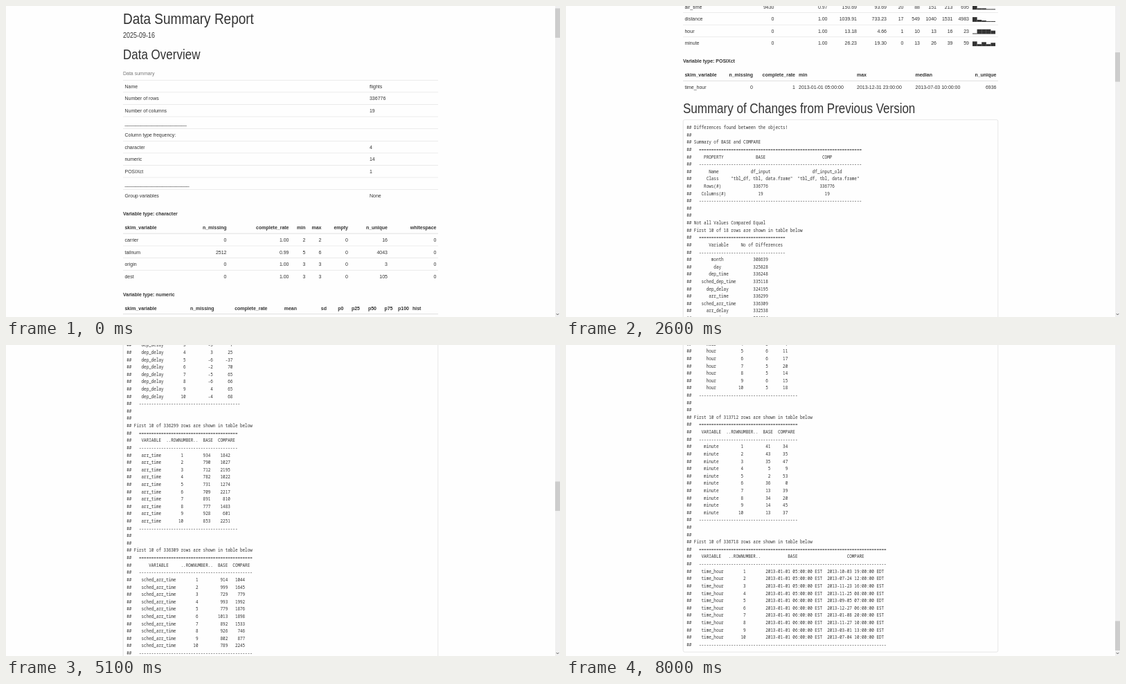
An HTML page for the animation above (8.7 s loop, 800 px wide and 450 px high).

```html
<!DOCTYPE html>
<html lang="en">
<head>
<meta charset="utf-8">
<title>Data Summary Report</title>
<style>
  html, body { margin: 0; height: 100%; overflow: hidden; background: #fefefe; }
  svg { display: block; width: 800px; height: 450px; }
  text { font: 14px "Liberation Sans", Arial, sans-serif; fill: #333; white-space: pre; }
  .title { font-size: 38px; }
  .date { font-size: 18px; }
  .h1 { font-size: 34px; }
  .caption { fill: #777; }
  .bold { font-weight: bold; }
  .code { font: 11.917px "Noto Sans Mono", monospace; }
  .end { text-anchor: end; }
</style>
</head>
<body>
<svg id="stage" viewBox="0 0 800 450"></svg>
<script>
const LOOP = 8700, SX = 0.5, SY = 0.5714;   // page units to stage pixels
const LEFT = 338, WIDTH = 910, ROW = 30.8, LINE = 18.5714;
const TOTAL = 336776;

const add = (parent, tag, attrs, content = "") => {
  const el = document.createElementNS("http://www.w3.org/2000/svg", tag);
  for (const key in attrs) el.setAttribute(key, attrs[key]);
  el.textContent = content;
  parent.append(el);
  return el;
};
const stage = document.getElementById("stage");
const page = add(stage, "g", {});
const write = (content, x, y, cls = "") => add(page, "text", { x, y, class: cls }, content);
const box = (x, y, width, height, fill, parent = page) =>
  add(parent, "rect", { x, y, width, height, fill });

let seed = 7;
const random = () => (seed = seed * 16807 % 2147483647) / 2147483647;
const between = (lo, hi) => Math.floor(lo + random() * (hi - lo + 1));
const pick = words => words.split(" ")[between(0, words.split(" ").length - 1)];
const clamp = (v, lo, hi) => Math.min(hi, Math.max(lo, Math.round(v)));

// ---- Tables: a positive column is a right edge, a negative one a left edge
const cell = (content, col, y, cls = "") =>
  write(content, Math.abs(col), y, cls + (col > 0 ? " end" : ""));

function hist(levels, x, y) {
  [...levels].forEach((n, i) => box(x + i * 13.2, y + 3 - n * 1.7, 13.3, n * 1.7, "#333"));
}

function table(top, cols, head, rows) {
  head.split(" ").forEach((h, i) => cell(h, cols[i], top + 20, "bold"));
  box(LEFT, top + 30, WIDTH, 1.6, "#ddd");
  rows.forEach((row, r) => {
    const y = top + 51.6 + r * ROW;
    if (r) box(LEFT, y - 20.8, WIDTH, 1, "#ddd");
    row.forEach((v, i) => i === 10 ? hist(v, -cols[i], y) : cell(v, cols[i], y));
  });
}

write("Data Summary Report", LEFT, 46.15, "title");
write("2025-09-16", LEFT, 79.95, "date");
write("Data Overview", LEFT, 134.55, "h1");
write("Data summary", LEFT, 174.25, "caption");
[
  ["Name", "flights"], ["Number of rows", TOTAL], ["Number of columns", "19"],
  ["_".repeat(23)], ["Column type frequency:"], ["character", "4"], ["numeric", "14"],
  ["POSIXct", "1"], ["_".repeat(24)], ["Group variables", "None"],
].forEach(([name, value = ""], i) => {
  const y = 187.25 + i * ROW;
  box(LEFT, y, WIDTH, 1, "#ddd");
  write(name, 343, y + 20.8);
  write(value, 1050, y + 20.8);
});

const rate = missing => (1 - missing / TOTAL).toFixed(2);
const words = (name, missing, min, max, unique) =>
  [name, missing, rate(missing), min, max, 0, unique, 0];

write("Variable type: character", LEFT, 530.25, "bold");
table(545.25, [-343, 637, 817, 865, 911, 988, 1102, 1243],
  "skim_variable n_missing complete_rate min max empty n_unique whitespace", [
    words("carrier", 0, 2, 2, 16),
    words("tailnum", 2512, 5, 6, 4043),
    words("origin", 0, 3, 3, 3),
    words("dest", 0, 3, 3, 105),
  ]);

// name: missing, mean, sd, min, max, histogram shape
const stats = {
  year: [0, 2013, 0, 2013, 2013, "11711"],
  month: [0, 6.55, 3.41, 1, 12, "76667"],
  day: [0, 15.71, 8.77, 1, 31, "77776"],
  dep_time: [8255, 1349.11, 488.28, 1, 2400, "17673"],
  sched_dep_time: [0, 1344.25, 467.34, 106, 2359, "17773"],
  dep_delay: [8255, 12.64, 40.21, -43, 1301, "71111"],
  arr_time: [8713, 1502.05, 533.26, 1, 2400, "13777"],
  sched_arr_time: [0, 1536.38, 497.46, 1, 2359, "13777"],
  arr_delay: [9430, 6.9, 44.63, -86, 1272, "71111"],
  flight: [0, 1971.92, 1632.47, 1, 8500, "73311"],
  air_time: [9430, 150.69, 93.69, 20, 695, "72211"],
  distance: [0, 1039.91, 733.23, 17, 4983, "73211"],
  hour: [0, 13.18, 4.66, 1, 23, "17775"],
  minute: [0, 26.23, 19.3, 0, 59, "73635"],
};
const numeric = Object.entries(stats).map(([name, [missing, mean, sd, lo, hi, shape]]) => {
  const quartiles = [-0.67, 0, 0.67].map(z => clamp(mean + z * sd, lo, hi));
  return [name, missing, rate(missing), mean.toFixed(2), sd.toFixed(2), lo, ...quartiles, hi, shape];
});

write("Variable type: numeric", LEFT, 734.25, "bold");
table(749.25, [-343, 601, 755, 840, 926, 975, 1022, 1070, 1117, 1164, -1174],
  "skim_variable n_missing complete_rate mean sd p0 p25 p50 p75 p100 hist", numeric);

write("Variable type: POSIXct", LEFT, 1246.25, "bold");
table(1261.25, [-343, 540, 662, -672, -840, -1009, 1243],
  "skim_variable n_missing complete_rate min max median n_unique",
  [["time_hour", 0, 1, "2013-01-01 05:00:00", "2013-12-31 23:00:00", "2013-07-03 10:00:00", 6936]]);

write("Summary of Changes from Previous Version", LEFT, 1373.55, "h1");

// ---- Comparison printout
const lines = [];
const print = (s = "") => lines.push("## " + s);
const center = (s, w) => {
  const left = Math.floor((w - s.length) / 2);
  return (" ".repeat(left) + s).padEnd(w);
};
const widest = col => Math.max(...col.map(s => s.length));

// Each column is a list of strings with its heading first
function grid(columns) {
  const widths = columns.map(widest);
  const total = widths.reduce((a, w) => a + w + 2, 0);
  const rule = ch => print("  " + ch.repeat(total));
  const row = r => print("   " + columns.map((c, i) => center(c[r], widths[i])).join("  "));
  rule("=");
  row(0);
  rule("-");
  for (let r = 1; r < columns[0].length; r++) row(r);
  rule("-");
  print();
  print();
}

// Ten made-up values under a heading, aligned right
function column(head, make) {
  const list = Array.from({ length: 10 }, (_, i) => String(make(i)));
  return [head, ...list.map(v => v.padStart(widest(list)))];
}

const spread = name => {
  const [, mean, sd, lo, hi] = stats[name];
  return () => clamp(mean + sd * 1.7 * (2 * random() - 1), lo, hi);
};
const two = n => String(n).padStart(2, "0");
const stamp = (month, day, hour) =>
  `2013-${two(month)}-${two(day)} ${two(hour)}:00:00 ${month > 3 && month < 11 ? "EDT" : "EST"}`;

const carrier = () => pick("UA AA B6 DL EV MQ US");
const tail = () => "N" + between(301, 829) + pick("JB AA UA MQ NB NW");
const origin = () => pick("EWR LGA JFK");
const dest = () => pick("IAH MIA BQN ATL ORD FLL IAD MCO");
const anyHour = () => stamp(between(1, 12), between(1, 28), between(6, 20));
const firstHours = i => stamp(1, 1, i < 4 ? 5 : 6);

// name, differences, then the range or rule of the base values
const blocks = [
  ["month", 308639, [1, 1]],
  ["day", 325828, [1, 1]],
  ["dep_time", 336248, [517, 558]],
  ["sched_dep_time", 335118, [515, 600]],
  ["dep_delay", 324195, [-6, 4]],
  ["arr_time", 336299, [709, 1004]],
  ["sched_arr_time", 336309, [723, 1022]],
  ["arr_delay", 332538, [-25, 33]],
  ["carrier", 294014, carrier, carrier],
  ["flight", 336520, [79, 1714]],
  ["tailnum", 336593, tail, tail],
  ["origin", 224398, origin, origin],
  ["dest", 328706, dest, dest],
  ["air_time", 334418, [53, 227]],
  ["distance", 334915, [229, 1416]],
  ["hour", 316284, [5, 6]],
  ["minute", 313712, [0, 58]],
  ["time_hour", 336718, firstHours, anyHour],
];

print("Differences found between the objects!");
print();
print("Summary of BASE and COMPARE");
const kind = '"tbl_df, tbl, data.frame"', size = String(TOTAL);
grid([
  ["PROPERTY", "Name", "Class", "Rows(#)", "Columns(#)"],
  ["BASE", "df_input", kind, size, "19"],
  ["COMP", "df_input_old", kind, size, "19"],
]);
print("Not all Values Compared Equal");
print("First 10 of 18 rows are shown in table below");
grid([
  column("Variable", i => blocks[i][0]).map(s => s.trim()),
  column("No of Differences", i => blocks[i][1]),
]);
for (const [name, count, base, compare = spread(name)] of blocks) {
  print(`First 10 of ${count} rows are shown in table below`);
  grid([
    column("VARIABLE", () => name),
    column("..ROWNUMBER..", i => i + 1),
    column("BASE", Array.isArray(base) ? () => between(...base) : base),
    column("COMPARE", compare),
  ]);
}
lines.length -= 2;
lines.forEach((s, i) => write(s.trimEnd(), 348.3, 1414.3 + i * LINE, "code"));
add(page, "rect", {
  x: LEFT + 0.4, y: 1390.65, width: WIDTH - 0.8, height: lines.length * LINE + 19.8,
  rx: 4, fill: "none", stroke: "#ccc", "stroke-width": 0.9,
});

// ---- Scrollbar
box(793, 0, 7, 450, "#f0f0f0", stage);
const thumb = box(793, 0, 7, 42.5, "#cdcdcd", stage);
add(stage, "path", { d: "M794.8 445.2l1.7 1.7 1.7-1.7", fill: "none", stroke: "#505050" });

// ---- Scrolling: start time, steps of 100 ms, position reached
const END = 3916.6;
const moves = [
  [300, 3, 60], [800, 4, 180], [1300, 7, 420], [2100, 8, 660], [3000, 7, 906.9],
  [3800, 3, 1170], [4200, 3, 1430], [4600, 3, 1690], [5000, 2, 1920],
  [5400, 2, 2160], [5700, 3, 2460], [6100, 3, 2760],
  [6500, 2, 3050], [6800, 2, 3330], [7100, 3, 3630], [7500, 2, END],
];
function scrollAt(t) {
  let y = 0;
  for (const [start, steps, to] of moves) {
    if (t < start) break;
    const p = Math.min(1, (Math.floor((t - start) / 100) + 1) / steps);
    y += (to - y) * (1 - (1 - p) ** 1.5);
  }
  return y;
}
function draw() {
  const y = scrollAt(performance.now() % LOOP);
  page.setAttribute("transform", `translate(0 ${-y}) scale(${SX} ${SY})`);
  thumb.setAttribute("y", 3.4 + y / END * 396);
  requestAnimationFrame(draw);
}
draw();
</script>
</body>
</html>
```
